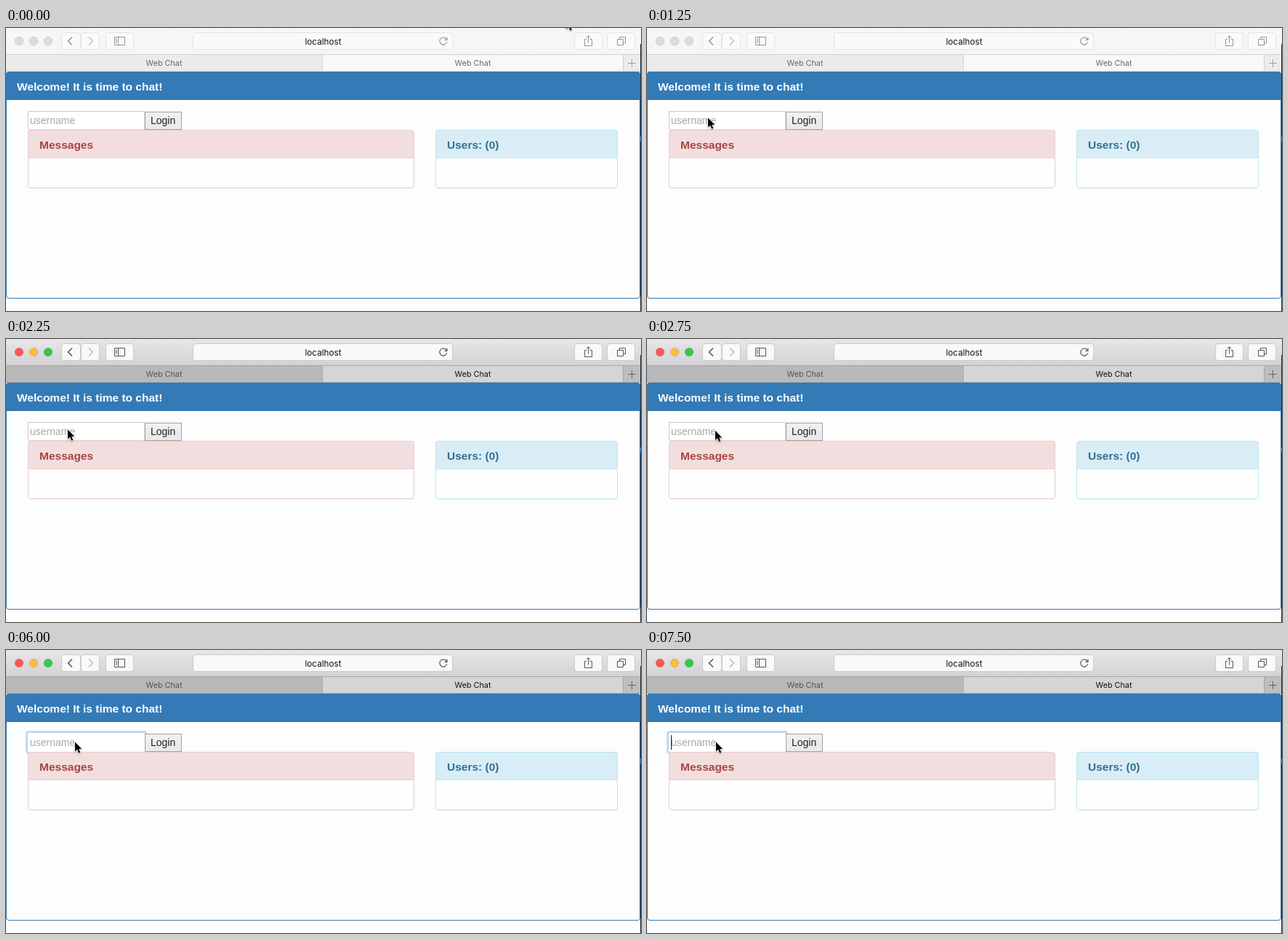
Animation, 874 px wide and 389 px high, one loop 8000 ms. Source, as an HTML page:

```html
<!DOCTYPE html>
<html lang="en">
<head>
<meta charset="utf-8">
<title>Web Chat</title>
<style>
  html, body { margin: 0; width: 100%; height: 100%; overflow: hidden; background: #fdfdfd; }
  svg {
    display: block; width: 874px; height: 389px;
    --bar-top: #f7f7f7; --bar-end: #f5f5f5; --tab: #ebebeb; --tab-on: #f8f8f8; --plus: #ececec;
    --line: #d2d2d2; --btn: #fafafa; --btn-line: #e4e4e4; --icon: #969696; --dim: #bdbdbd;
    --label: #686868; --label-on: #686868;
    --red: #dcdcdc; --yellow: #dcdcdc; --green: #dcdcdc; --ring: #cfcfcf;
  }
  svg.active {
    --bar-top: #e8e6e8; --bar-end: #d3d1d3; --tab: #b9b8b9; --tab-on: #d6d5d6; --plus: #bfbebf;
    --line: #a9a8a9; --btn: #f9f9f9; --btn-line: #cccbcc; --icon: #555; --dim: #b5b5b5;
    --label: #555; --label-on: #111;
    --red: #fc5753; --yellow: #fdbc40; --green: #34c84a; --ring: rgba(0,0,0,.12);
  }
  .ui { font-family: Inter, Roboto, sans-serif; text-anchor: middle; }
  .tab-label { font-size: 10.8px; }
  .page { font: 14px "Liberation Sans", Arial, sans-serif; }
  .head { font-weight: bold; font-size: 15.5px; }
  .btn rect { fill: var(--btn); stroke: var(--btn-line); }
  .icon { fill: none; stroke: var(--icon); }
  .shadow { fill: none; stroke: #000; stroke-opacity: .06; }
</style>
</head>
<body>
<svg id="stage" viewBox="0 0 874 389">
  <defs>
    <linearGradient id="bar" x2="0" y2="1">
      <stop style="stop-color:var(--bar-top)"/>
      <stop offset="1" style="stop-color:var(--bar-end)"/>
    </linearGradient>
    <linearGradient id="login" x2="0" y2="1">
      <stop stop-color="#f1f1f1"/>
      <stop offset="1" stop-color="#e9e9e9"/>
    </linearGradient>
  </defs>
  <rect width="874" height="389" fill="#fdfdfd"/>

  <g id="toolbar" class="ui">
    <rect width="874" height="37" fill="url(#bar)"/>
    <g stroke="var(--ring)">
      <circle cx="18" cy="18" r="5.8" fill="var(--red)"/>
      <circle cx="38" cy="18" r="5.8" fill="var(--yellow)"/>
      <circle cx="58" cy="18" r="5.8" fill="var(--green)"/>
    </g>
    <g class="btn" id="buttons"></g>
    <g class="icon">
      <path d="M91 12.5L85.5 18L91 23.5" stroke-width="1.5"/>
      <path d="M114 12.5L119.5 18L114 23.5" stroke="var(--dim)" stroke-width="1.3"/>
      <path d="M149.500 12.500H163.500V23.500H149.500ZM154.500 12.500V23.500M151 15.500H153M151 17.500H153M151 19.500H153"/>
      <path d="M606.600 16.300A5 5 0 1 0 606.800 19M603.300 16.500H607V12.800" stroke-width="1.2"/>
      <path d="M799 15.500H796.500V24.500H806.500V15.500H804M801.500 20.500V10.800M798.800 13.300L801.500 10.600L804.200 13.300"/>
      <path d="M841.500 21.500V23.500H841.500V15.500H849.500V23.500H841.500M844.500 15V12.500H852.500V20.500H850"/>
    </g>
    <text x="436.500" y="22.600" font-size="11.700" fill="#111">localhost</text>
  </g>

  <g class="ui">
    <rect y="36" width="436" height="24" fill="var(--tab)"/>
    <rect x="436" y="36" width="413" height="24" fill="var(--tab-on)"/>
    <rect x="849" y="36" width="25" height="24" fill="var(--plus)"/>
    <path d="M0 36.500H874M435.500 37V60M849.500 37V60M0 59.500H874" stroke="var(--line)"/>
    <path d="M856 48.500H867M861.500 43V54" stroke="var(--icon)" stroke-opacity=".85"/>
    <text class="tab-label" x="217.500" y="52" fill="var(--label)">Web Chat</text>
    <text class="tab-label" x="642.500" y="52" fill="var(--label-on)">Web Chat</text>
  </g>

  <g class="page">
    <rect x="873" y="22" width="1" height="367" fill="#1d2b3a"/>
    <rect x="873" y="149" width="1" height="7" fill="#3f86c4"/>
    <rect x=".5" y="60.500" width="872" height="311" rx="3.500" fill="#fdfdfd" stroke="#337ab7"/>
    <path d="M0 99V64Q0 60 4 60H869Q873 60 873 64V99Z" fill="#337ab7"/>
    <text class="head" x="15" y="86" fill="#fff">Welcome! It is time to chat!</text>

    <rect id="focus" x="28.500" y="112.500" width="164" height="29" rx="2.500" fill="#fff" stroke="#bfdaf3" stroke-width="3"/>
    <g id="field">
      <rect x="30.500" y="114.500" width="160" height="25" fill="#fff" stroke="#dedad8"/>
      <path d="M30.500 139V114.500H190" fill="none" stroke="#c9c9c9"/>
    </g>
    <text x="33" y="132" fill="#a9a9a9">username</text>
    <rect id="caret" x="33" y="117" width="1" height="20" fill="#111"/>
    <rect x="191.500" y="115.500" width="50" height="24" fill="url(#login)" stroke="#a3a3a3"/>
    <text x="199" y="132" fill="#222">Login</text>
    <g id="panels"></g>
  </g>

  <path id="cursor" d="M0 0V13L3 10.300L5.200 15.200L7.300 14.300L5.200 9.500H9.200Z" fill="#000" stroke="#fff" stroke-width="1.200" paint-order="stroke" style="filter:drop-shadow(0 1px 1px rgba(0,0,0,.3))"/>
</svg>
<script>
  const LOOP = 8000, ACTIVE_AT = 1750, FOCUS_AT = 4500, BLINK = 500;
  // [time, x, y] of the pointer tip; each pose holds until the next
  const POINTER = [
    [0, 771.5, -11.5], [250, 764, -2], [500, 645, 37.5], [750, 336.5, 116.5],
    [1000, 103, 140], [1250, 84, 123.5], [2250, 85, 124.5], [2500, 92.5, 127],
    [2750, 94, 126], [4500, 95, 126.5]
  ];
  const BUTTONS = [[76, 27], [103, 26], [137, 39], [257, 358], [782, 39], [827, 39]];
  const PANELS = [
    { x: 30, w: 532, title: "Messages", line: "#ebccd1", fill: "#f2dede", ink: "#a94442" },
    { x: 591, w: 251, title: "Users: (0)", line: "#bce8f1", fill: "#d9edf7", ink: "#31708f" }
  ];
  const el = id => document.getElementById(id);

  el("buttons").innerHTML = BUTTONS.map(([x, w]) =>
    `<rect x="${x + .5}" y="6.500" width="${w - 1}" height="23" rx="3.500"/>`).join("");

  el("panels").innerHTML = PANELS.map(({ x, w, title, line, fill, ink }) => `
    <rect class="shadow" x="${x + .5}" y="141.500" width="${w - 1}" height="79" rx="3.500"/>
    <rect x="${x + .5}" y="140.500" width="${w - 1}" height="79" rx="3.500" fill="#fefefe" stroke="${line}"/>
    <path d="M${x + .5} 178.500V144q0-3.500 3.500-3.500h${w - 8}q3.500 0 3.500 3.500V178.500Z" fill="${fill}" stroke="${line}"/>
    <text class="head" x="${x + 16}" y="166" fill="${ink}">${title}</text>`).join("");

  const show = (id, on) => el(id).style.visibility = on ? "visible" : "hidden";

  function render(t) {
    const [, x, y] = POINTER.findLast(([start]) => start <= t);
    const focused = t >= FOCUS_AT;
    el("cursor").setAttribute("transform", `translate(${x} ${y})`);
    el("stage").classList.toggle("active", t >= ACTIVE_AT);
    show("focus", focused);
    show("field", !focused);
    show("caret", focused && Math.floor((t - FOCUS_AT) / BLINK) % 2 === 0);
  }

  const start = performance.now();
  function tick() {
    render((performance.now() - start) % LOOP);
    requestAnimationFrame(tick);
  }
  tick();
</script>
</body>
</html>
```
